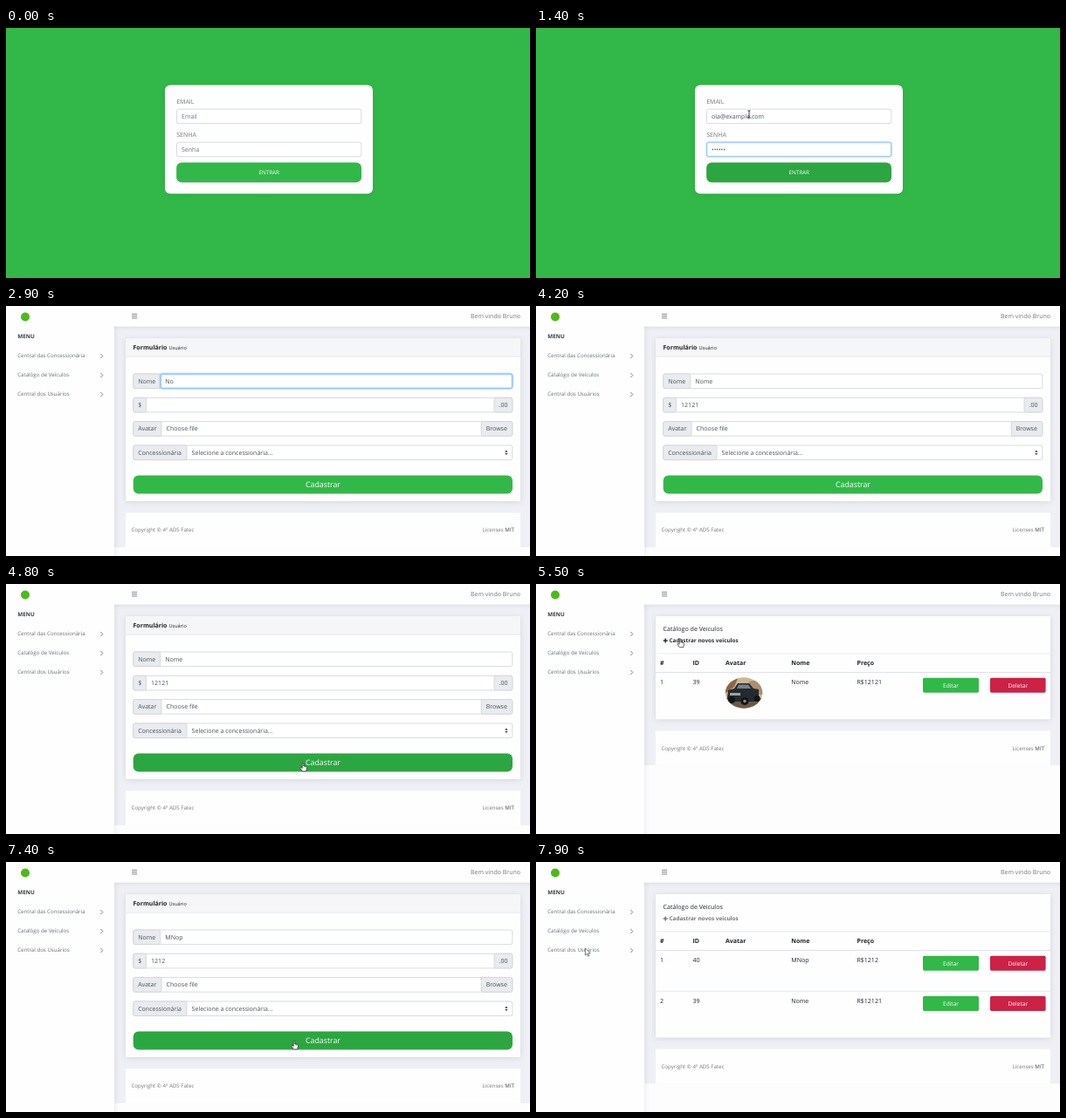
An HTML page that plays this animation: 600x287 px, repeating every 8000 ms.

```html
<!DOCTYPE html>
<html lang="pt-BR">
<head>
<meta charset="utf-8">
<title>Catálogo de Veiculos</title>
<style>
html, body { margin: 0; width: 100%; height: 100%; overflow: hidden; background: #fdfdfe; }
svg { display: block; width: 600px; height: 287px; }
text { font-family: "Open Sans", "Noto Sans", sans-serif; font-size: 7.03px; fill: #212529;
  text-rendering: geometricPrecision; white-space: pre; }
.b { font-weight: 700; }
.m { font-weight: 500; }
.s { font-size: 6.15px; }
.grey { fill: #777; }
.val { fill: #495057; }
.hint { fill: #6c757d; }
.white { fill: #fff; }
.mid { text-anchor: middle; }
.end { text-anchor: end; }
.card { fill: #fefeff; filter: drop-shadow(0 1px 3px rgba(40, 45, 60, .13)); }
.bar { fill: #fefeff; filter: drop-shadow(0 0 3px rgba(40, 45, 60, .13)); }
.field { fill: #fff; stroke: #ced2d8; stroke-width: .8; }
.addon { fill: #e9ebef; stroke: #ced2d8; stroke-width: .8; }
.line { stroke: #dee1e6; stroke-width: .7; }
.icon { fill: none; stroke: #777; stroke-width: .9; }
.ring { fill: none; stroke: #80bdff; stroke-width: .9; filter: drop-shadow(0 0 1px rgba(0, 123, 255, .6)); }
</style>
</head>
<body>
<svg id="stage" viewBox="0 0 600 287"></svg>
<script>
const LOOP = 8000, STEP = 100;
const GREEN = '#32b848', RED = '#cd2146', EMAIL = 'ola@example.com';

const rect = (x, y, x2, y2, attrs = '', r = 0) =>
  `<rect x="${x}" y="${y}" width="${x2 - x}" height="${y2 - y}" rx="${r}" ${attrs}/>`;
const text = (x, y, str, cls = '', attrs = '') =>
  `<text x="${x}" y="${y}" class="${cls}" ${attrs}>${str}</text>`;
const hline = (y, attrs = '') => `<path d="M137 ${y}H589" class="line" ${attrs}/>`;
const group = (id, body) => `<g id="${id}">${body}</g>`;

function login() {
  return rect(0, 0, 600, 287, `fill="${GREEN}"`) +
    rect(182, 65.5, 420, 190.3, 'class="card"', 6) +
    text(195.2, 86.8, 'EMAIL', 'grey') +
    rect(195.5, 93.2, 406.8, 109.6, 'class="field"', 2) +
    text(201, 103.9, '', 'val', 'id="email"') +
    text(195.2, 124.6, 'SENHA', 'grey') +
    rect(195.5, 131.2, 406.8, 147.6, 'class="field"', 2) +
    text(201, 141.9, '', 'val', 'id="pass"') +
    rect(195.5, 93.2, 406.8, 109.6, 'class="ring" id="emailRing" opacity=".7"', 2) +
    rect(195.5, 131.2, 406.8, 147.6, 'class="ring" id="passRing" opacity=".7"', 2) +
    rect(195.2, 154.5, 407, 177.2, `id="enter" fill="${GREEN}" style="filter:drop-shadow(0 .5px .6px rgba(0,0,0,.2))"`, 6) +
    text(301.2, 168.3, 'ENTRAR', 'mid white', 'style="font-size:6.32px"');
}

function chrome() {
  const items = ['Central das Concessionária', 'Catalógo de Veículos', 'Central dos Usuários'];
  const menu = items.map((name, i) => {
    const y = 59.1 + 22 * i;
    return text(13.2, y, name, 's', 'style="fill:#66716f"') +
      `<path d="M108.3 ${y - 4.2}l2.5 2.6-2.5 2.6" class="icon" stroke-width=".8"/>`;
  }).join('');
  return rect(-5, 20, 124, 295, 'class="bar"') +
    rect(-5, -5, 605, 23.6, 'class="bar"') + rect(-5, 15, 123.5, 40, 'fill="#fefeff"') +
    `<circle cx="22" cy="12.5" r="5" fill="#4cbb17"/>` +
    '<path d="M144 9.3h6.2M144 11.6h6.2M144 13.9h6.2" class="icon"/>' +
    text(589, 13.9, 'Bem vindo Bruno', 'end grey') +
    text(13.2, 36.9, 'MENU', 'b s', 'style="fill:#3a3d42;font-size:6.35px"') + menu;
}

// Page background, main card and footer; the footer follows the card.
function frame(cardEnd) {
  const top = cardEnd + 13.4, end = top + 39.6;
  return rect(124, 20, 600, end, 'fill="#eff0f5"') +
    rect(137, 37, 589, cardEnd, 'class="card"', 1) +
    rect(137, top, 589, end, 'fill="#fefeff"') +
    text(143.5, top + 22, 'Copyright © 4º ADS Fatec', 's grey') +
    text(582, top + 22, 'Licenses <tspan class="m" fill="#444">MIT</tspan>', 's grey end');
}

function truck() {
  return `<g id="truck"><clipPath id="oval"><ellipse cx="238.1" cy="125" rx="21.2" ry="17.7"/></clipPath>
    <g clip-path="url(#oval)">
    ${rect(216, 106, 260, 144, 'fill="#cfb594"')}
    <path d="M216 106h16l-5 12-11 8z" fill="#8b6548"/><path d="M244 112l16-3v18h-16z" fill="#a98e70"/>
    ${rect(216, 131, 260, 144, 'fill="#6b5947"')}
    <path d="M220 122l7-2 4-6h13l5 6 6 1v11l-5 3h-27l-4-4z" fill="#252a30"/>
    <path d="M232 115.500h11l3 4.500h-16z" fill="#71828c"/>
    <path d="M222 125h12v3h-12z" fill="#9ca3a6"/>
    <g fill="#121417"><circle cx="224" cy="133" r="4"/><circle cx="239" cy="134.500" r="4.600"/><circle cx="253" cy="131.500" r="3.500"/></g>
    <circle cx="239" cy="134.500" r="1.700" fill="#888"/></g></g>`;
}

function row(i, [id, name, price]) {
  const y = 101.7 + 46.2 * i;
  const button = (x, x2, label, color) => rect(x, y + 6, x2, y + 23, `fill="${color}"`, 1.6) +
    text((x + x2) / 2, y + 16.9, label, 'mid white', 'style="font-size:6.6px"');
  return (i ? hline(y + .4) : '') +
    [[142, i + 1], [179.5, id], [292.3, name], [367.5, price]].map(([x, s]) => text(x, y + 13.6, s)).join('') +
    button(443, 507, 'Editar', GREEN) + button(520, 583.6, 'Deletar', RED);
}

function catalog(rows) {
  const heads = [[142, '#'], [179.5, 'ID'], [217, 'Avatar'], [292.3, 'Nome'], [367.5, 'Preço']];
  return frame(109 + 46.2 * rows.length) +
    text(145.5, 54.3, 'Catálogo de Veiculos', 'm', 'style="font-size:7.12px"') +
    '<g class="link"><path d="M145.700 64.900h5M148.200 62.400v5" stroke="currentColor" stroke-width="1.500"/>' +
    text(152.5, 67.3, 'Cadastrar novos veiculos', 'b', 'style="font-size:6.38px;fill:currentColor"') + '</g>' +
    hline(80) + heads.map(([x, s]) => text(x, 93.3, s, 'b')).join('') +
    hline(101.6, 'style="stroke-width:1"') + rows.map((r, i) => row(i, r)).join('');
}

function form() {
  const line = (y, label, split, id, value, suffix, cut) =>
    rect(145.8, y, 579.8, y + 16.6, 'class="field"', 2) +
    rect(145.8, y, split, y + 16.6, 'class="addon"', 2) +
    text(151.2, y + 10.8, label, 'val') +
    text(split + 5.6, y + 10.8, value, 'val', `id="${id}"`) +
    (suffix ? rect(cut, y, 579.8, y + 16.6, 'class="addon"', 2) + text(cut + 5.6, y + 10.8, suffix, 'val') : '');
  return frame(224) +
    rect(137, 37, 589, 58, 'fill="#f6f6f8"') + hline(58.2) +
    text(145.5, 50, 'Formulário', 'b') +
    text(186.4, 50, 'Usuário', '', 'style="font-size:5.62px"') +
    line(78, 'Nome', 176.7, 'name', '') +
    line(105.3, '$', 160.5, 'price', '', '.00', 559) +
    line(132.6, 'Avatar', 178, 'file', 'Choose file', 'Browse', 544.2) +
    line(160, 'Concessionária', 207, 'dealer', 'Selecione a concessionária...') +
    '<path d="M571.200 167.700l1.700-2.200 1.700 2.200zM571.200 168.900l1.700 2.200 1.700-2.200z" fill="#343a40"/>' +
    rect(177, 78, 579.8, 94.6, 'class="ring" id="nameRing"', 2) +
    rect(160.5, 105.3, 559, 121.9, 'class="ring" id="priceRing"', 2) +
    rect(178, 132.6, 579.8, 149.2, 'class="ring" id="fileRing"', 2) +
    rect(207, 160, 579.8, 176.6, 'class="ring" id="dealerRing"', 2) +
    rect(145.7, 194.5, 580, 215.5, `id="save" fill="${GREEN}"`, 6) +
    text(363, 208, 'Cadastrar', 'mid white', 'style="font-size:8.79px"');
}

const cursors =
  '<g id="arrow" fill="#fff" stroke="#222" stroke-width=".6"><path d="M0 0v8.200l1.900-1.700 1.300 2.900 1.300-.6-1.300-2.800h2.600z"/></g>' +
  '<g id="hand" fill="#fff" stroke="#222" stroke-width=".7"><path d="M-.8.5q.8-1 1.600 0v3.500l3 .8q.9.300.7 1.300l-.7 3.900h-4.500l-2.600-3.800q.3-1.300 1.500-.4l1 .8z"/></g>' +
  '<g id="beam" fill="none" stroke="#222" stroke-width=".8"><path d="M-1.700-4h3.400M-1.700 4h3.400M0-4v8"/></g>';

const first = ['39', 'Nome', 'R$12121'], second = ['40', 'MNop', 'R$1212'];
document.getElementById('stage').innerHTML =
  group('form', form()) + group('cat0', catalog([])) +
  group('cat1', catalog([first]) + truck()) + group('cat2', catalog([second, first])) +
  group('chrome', chrome()) + group('login', login()) + cursors;

const $ = id => document.getElementById(id);
const show = (id, on) => { $(id).style.display = on ? '' : 'none'; };
const put = (id, str) => { $(id).textContent = str; };
const within = (t, a, b) => t >= a && t < b;
const typed = (str, t, a, b) => str.slice(0, Math.max(0, Math.round(str.length * Math.min(1, (t - a) / (b - a)))));
const last = (table, t) => table.filter(e => e[0] <= t).pop();

const pages = [[0, 'login'], [1500, 'cat0'], [2300, 'form'], [5000, 'cat1'], [5600, 'form'], [7600, 'cat2']];
// time, x, y, pointer shape
const moves = [
  [0, 244, 99, ''], [1000, 244, 99, 'beam'], [1500, 244, 99, 'arrow'], [1700, 50, 78, 'hand'],
  [1900, 50, 78, 'arrow'], [2100, 197, 62.7, 'hand'], [2300, 197, 62.7, 'arrow'], [2600, 260, 86, 'beam'],
  [2800, 260, 86, ''], [4300, 274, 140, 'arrow'], [4500, 280, 166, 'arrow'], [4700, 340, 205, 'hand'],
  [5000, 340, 205, 'arrow'], [5300, 165, 62.7, 'hand'], [5600, 165, 62.7, 'arrow'], [5700, 250, 86, 'beam'],
  [5800, 250, 86, ''], [6400, 270, 142, 'arrow'], [6500, 274.6, 161, 'arrow'], [7200, 274.6, 161, 'arrow'],
  [7400, 330, 205, 'hand'], [7600, 330, 205, 'arrow'], [7900, 56.4, 98.8, 'arrow']
];
const focus = [[0, ''], [100, 'email'], [600, 'pass'], [2700, 'name'], [3200, 'price'], [3600, ''],
  [4500, 'dealer'], [4700, ''], [5700, 'name'], [6100, 'price'], [6400, 'file'], [7200, 'dealer'], [7400, '']];

function movePointer(t) {
  const now = last(moves, t), next = moves[moves.indexOf(now) + 1] || now;
  const p = next === now ? 0 : (t - now[0]) / (next[0] - now[0]);
  const k = p * p * (3 - 2 * p);
  const x = now[1] + (next[1] - now[1]) * k, y = now[2] + (next[2] - now[2]) * k;
  for (const id of ['arrow', 'hand', 'beam']) {
    show(id, id === now[3]);
    $(id).setAttribute('transform', `translate(${x} ${y})`);
  }
  return now[3];
}

function draw(t) {
  const page = last(pages, t)[1], active = last(focus, t)[1];
  for (const id of ['login', 'form', 'cat0', 'cat1', 'cat2']) show(id, id === page);
  show('chrome', page !== 'login');
  for (const id of ['email', 'pass', 'name', 'price', 'file', 'dealer']) show(id + 'Ring', id === active);

  const mail = typed(EMAIL, t, 100, 600), pass = typed('••••••', t, 600, 900);
  put('email', mail || 'Email');
  put('pass', pass || 'Senha');
  $('email').setAttribute('class', mail ? 'val' : 'hint');
  $('pass').setAttribute('class', pass ? 'val' : 'hint');
  $('enter').setAttribute('fill', t >= 1000 ? '#2ba640' : GREEN);

  const again = t >= 5000;
  put('name', again ? typed('MNop', t, 5700, 6100) : typed('Nome', t, 2700, 3200));
  put('price', again ? typed('1212', t, 6100, 6400) : typed('12121', t, 3200, 3600));
  show('truck', t >= 5200);

  const pointer = movePointer(t);
  $('save').setAttribute('fill', pointer === 'hand' ? '#2ba640' : GREEN);
  const hover = within(t, 2000, 2300) || within(t, 5300, 5600);
  for (const el of document.querySelectorAll('.link')) el.style.color = hover ? '#2b2e33' : '#777';
}

function tick() {
  draw(Math.floor(performance.now() % LOOP / STEP) * STEP);
  requestAnimationFrame(tick);
}
tick();
</script>
</body>
</html>
```
